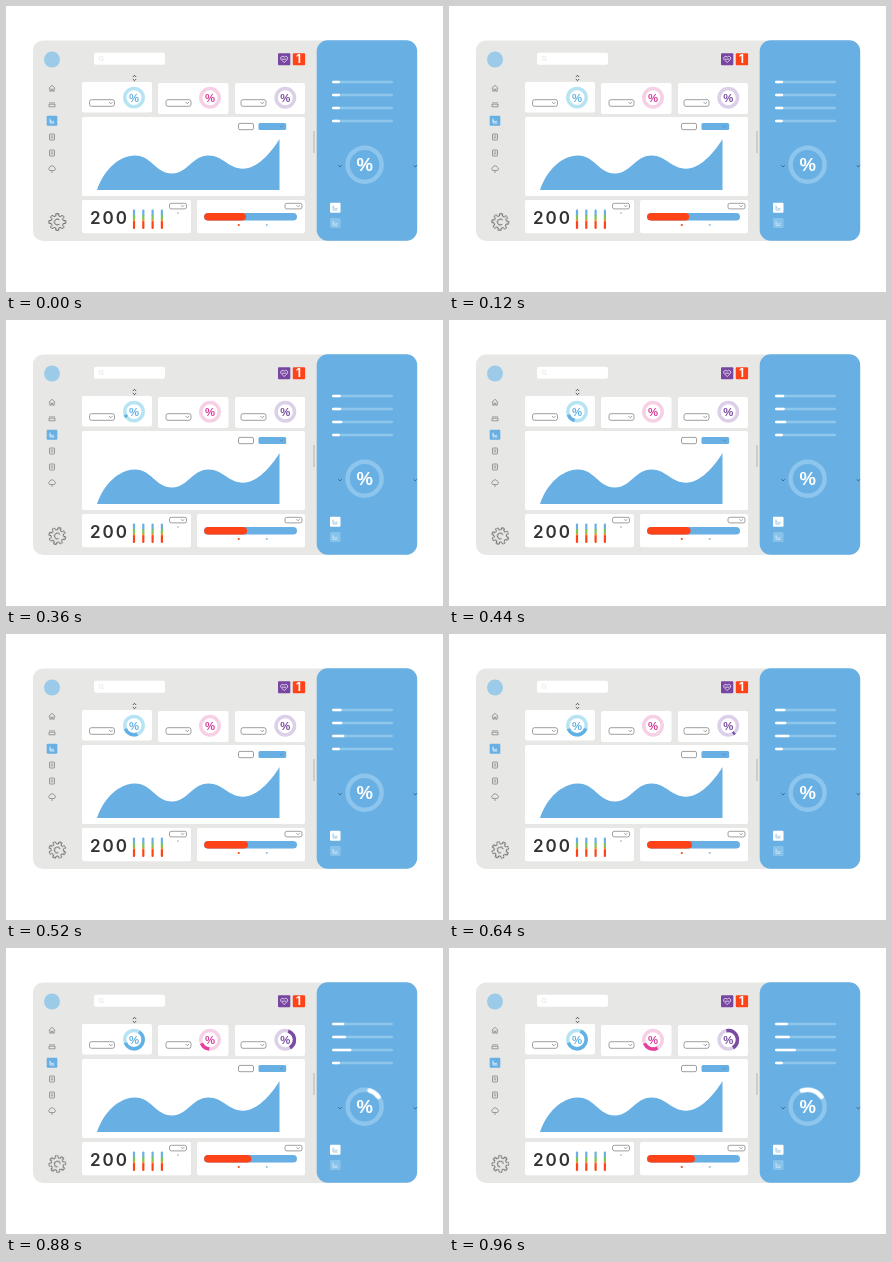
Recreate the animation shown at these times as an HTML page. Size 437 by 286 pixels, loop 1 s.

```html
<!DOCTYPE html>
<html lang="en">
<head>
<meta charset="utf-8">
<title>Dashboard</title>
<style>
html, body { margin: 0; width: 100%; height: 100%; overflow: hidden; background: #fff; }
svg { display: block; width: 437px; height: 286px; }
text { font-family: "Liberation Sans", Arial, sans-serif; font-weight: bold; text-anchor: middle; }
.num { font-family: Inter, Arial, sans-serif; }
.total { font-weight: 600; text-anchor: start; letter-spacing: 2px; }
.card { fill: #fff; }
.line { fill: none; stroke: #6c6c6c; stroke-width: .65; }
.blue { fill: #68b0e4; }
.red { fill: #ff4318; }
.ring { fill: none; stroke-width: 3.5; }
.big { stroke-width: 4.5; }
.arc { stroke-dasharray: 0 400; animation: 1s infinite; }

/* The picture advances every 40 ms; each span is cut into that many steps. */
.grow { animation: grow 1s infinite; }
@keyframes grow {
  0%   { width: var(--w); animation-timing-function: steps(3); }
  12%  { width: calc(var(--w) + .03 * var(--d)); animation-timing-function: steps(6); }
  36%  { width: calc(var(--w) + .18 * var(--d)); animation-timing-function: steps(4); }
  52%  { width: calc(var(--w) + .34 * var(--d)); animation-timing-function: steps(5); }
  72%  { width: calc(var(--w) + .6 * var(--d)); animation-timing-function: steps(4); }
  88%  { width: calc(var(--w) + .88 * var(--d)); animation-timing-function: steps(2); }
  96%, 100% { width: calc(var(--w) + var(--d)); }
}
.a1 { animation-name: a1; }
@keyframes a1 {
  0%, 32% { stroke-dasharray: 0 400; animation-timing-function: steps(1); }
  36% { stroke-dasharray: 18 400; animation-timing-function: steps(4); }
  52% { stroke-dasharray: 92 400; animation-timing-function: steps(5); }
  72% { stroke-dasharray: 175 400; animation-timing-function: steps(4); }
  88% { stroke-dasharray: 217 400; animation-timing-function: steps(2); }
  96%, 100% { stroke-dasharray: 228 400; }
}
.a2 { animation-name: a2; }
@keyframes a2 {
  0%, 68% { stroke-dasharray: 0 400; animation-timing-function: steps(1); }
  72% { stroke-dasharray: 15 400; animation-timing-function: steps(4); }
  88% { stroke-dasharray: 62 400; animation-timing-function: steps(2); }
  96%, 100% { stroke-dasharray: 96 400; }
}
.a3 { animation-name: a3; }
@keyframes a3 {
  0% { stroke-dasharray: 0 400; animation-timing-function: steps(1); }
  60% { stroke-dasharray: 0 400; animation-timing-function: steps(3); }
  72% { stroke-dasharray: 42 400; animation-timing-function: steps(4); }
  88% { stroke-dasharray: 132 400; animation-timing-function: steps(2); }
  96%, 100% { stroke-dasharray: 162 400; }
}
.a4 { animation-name: a4; stroke-linecap: round; }
@keyframes a4 {
  0%, 68% { stroke-dasharray: 0 400; opacity: 0; animation-timing-function: steps(1); }
  72% { stroke-dasharray: 3 400; opacity: 1; animation-timing-function: steps(4); }
  88% { stroke-dasharray: 38 400; opacity: 1; animation-timing-function: steps(2); }
  96%, 100% { stroke-dasharray: 74 400; opacity: 1; }
}
.gear { animation: turn 1s steps(25) infinite; }
@keyframes turn { to { transform: rotate(45deg); } }
</style>
</head>
<body>
<svg viewBox="0 0 437 286">
  <defs>
    <g id="drop">
      <rect class="line" width="25" height="6.6" rx="2"/>
      <path class="line" d="M19.5 2.3l1.8 1.8 1.8-1.8"/>
    </g>
    <g id="drop-s">
      <rect class="line" width="17" height="5.6" rx="1.8"/>
      <path class="line" d="M11.5 1.9l1.6 1.6 1.6-1.6"/>
    </g>
    <g id="stack">
      <rect class="blue" width="2.2" height="6.5" rx="1"/>
      <rect y="5.5" width="2.2" height="5" fill="#7bc65b"/>
      <rect y="10" width="2.2" height="2" fill="#f79a32"/>
      <rect class="red" y="11.5" width="2.2" height="8" rx="1"/>
    </g>
    <g id="doc" class="line">
      <rect x="-2.5" y="-3" width="5" height="6" rx=".6"/>
      <path d="M-1.3-1h2.6M-1.3 .8h2.6"/>
    </g>
    <clipPath id="pill"><rect x="198" y="207" width="93" height="7.7" rx="3.85"/></clipPath>
  </defs>

  <rect x="27" y="34.5" width="384" height="200.5" rx="10" fill="#e7e7e5"/>
  <rect class="blue" x="310.7" y="34.3" width="100.5" height="200.5" rx="11"/>

  <!-- sidebar -->
  <circle cx="46" cy="53.5" r="8" fill="#9bcbe8"/>
  <g class="line">
    <path d="M42.8 82.3l3.2-3 3.2 3M43.8 82v3.2h1.5v-2h1.4v2h1.5V82"/>
    <path d="M43 100.8v-2.6h6v2.6zM43.2 96.8h1.6M45.3 96.8h1.6M47.4 96.8h1.6"/>
    <path d="M43.8 164.5a1.8 1.8 0 0 1 .1-3.3a2.4 2.4 0 0 1 4.4 0a1.8 1.8 0 0 1 0 3.3zM45 166h2"/>
  </g>
  <rect class="blue" x="40.7" y="109.7" width="10.6" height="10" rx="1"/>
  <path d="M44 112.5v4.5h4.5M44 114l2 2 2-1" fill="none" stroke="#fff" stroke-width=".7"/>
  <use href="#doc" x="46" y="131"/>
  <use href="#doc" x="46" y="147"/>
  <g transform="translate(51.3 216)">
    <g class="gear" fill="none" stroke="#555" stroke-width=".9" stroke-linejoin="round">
      <path id="gear"/>
      <path d="M2.2-2.1A3 3 0 1 0 2.2 2.1"/>
    </g>
  </g>

  <!-- header -->
  <rect class="card" x="88" y="46.7" width="71" height="12" rx="2"/>
  <g fill="none" stroke="#ddd" stroke-width=".6"><circle cx="95" cy="52.3" r="2"/><path d="M96.5 53.8l1.3 1.3"/></g>
  <path d="M126.8 71l1.7-1.7 1.7 1.7M126.8 73l1.7 1.7 1.7-1.7" fill="none" stroke="#333" stroke-width=".8"/>
  <rect x="272" y="47.3" width="12.3" height="12" rx="1" fill="#7846a0"/>
  <path d="M278.2 56.6l-3.2-3.2a1.8 1.8 0 0 1 3.2-2.2a1.8 1.8 0 0 1 3.2 2.2zM276 53.2h4.4" fill="none" stroke="#fff" stroke-width=".7"/>
  <rect class="red" x="286.8" y="47.3" width="12.3" height="12" rx="1"/>
  <text class="num" x="292.6" y="57.4" font-size="11.5" fill="#fff">1</text>
  <path d="M308 125v22" stroke="#c2c2c2" stroke-width="1.4"/>

  <!-- cards -->
  <g class="card">
    <rect x="76" y="76" width="70" height="30.5" rx="2"/>
    <rect x="152" y="77" width="70.5" height="31" rx="2"/>
    <rect x="229" y="77" width="70" height="31" rx="2"/>
    <rect x="76" y="111" width="223" height="79" rx="2"/>
    <rect x="76" y="194" width="109" height="33.3" rx="2"/>
    <rect x="191" y="194" width="108" height="33.3" rx="2"/>
  </g>
  <use href="#drop" x="83.5" y="93.7"/>
  <use href="#drop" x="160" y="93.7"/>
  <use href="#drop" x="235" y="93.7"/>

  <g transform="translate(128 91.6)">
    <circle class="ring" r="9.2" stroke="#b7e4f3"/>
    <circle class="ring arc a1" r="9.2" stroke="#62b1e4" pathLength="360" transform="rotate(160) scale(1 -1)"/>
    <text y="3.9" font-size="11.3" fill="#62b1e4">%</text>
  </g>
  <g transform="translate(204 91.8)">
    <circle class="ring" r="9.2" stroke="#f6d0e5"/>
    <circle class="ring arc a2" r="9.2" stroke="#e83d9d" pathLength="360" transform="rotate(157) scale(1 -1)"/>
    <text y="3.9" font-size="11.3" fill="#d93c98">%</text>
  </g>
  <g transform="translate(279.3 91.8)">
    <circle class="ring" r="9.2" stroke="#dcd0e8"/>
    <circle class="ring arc a3" r="9.2" stroke="#794ba2" pathLength="360" transform="rotate(60) scale(1 -1)"/>
    <text y="3.9" font-size="11.3" fill="#794ba2">%</text>
  </g>

  <!-- chart -->
  <rect class="line" x="232.5" y="117.4" width="15" height="6.3" rx="1.5"/>
  <rect class="blue" x="252.5" y="117" width="27.7" height="7" rx="1.5"/>
  <path d="M274 119.7l1.5 1.5 1.5-1.5" fill="none" stroke="#4480ac" stroke-width=".7"/>
  <path class="blue" d="M91 184C98 164 113 149.6 129 149.6C146 149.6 149 167.5 166 167.5C182 167.5 186 149.6 202.5 149.6C217 149.6 222 162.7 237 162.7C251 162.7 265 147 273.5 133V184Z"/>

  <!-- totals -->
  <use href="#drop-s" x="163.5" y="197.3"/>
  <text class="num total" x="84" y="218.4" font-size="17" fill="#333">200</text>
  <use href="#stack" x="126.9" y="203.5"/>
  <use href="#stack" x="136.2" y="203.5"/>
  <use href="#stack" x="145.5" y="203.5"/>
  <use href="#stack" x="154.8" y="203.5"/>
  <path d="M171 207h2" stroke="#999" stroke-width=".8"/>

  <use href="#drop-s" x="279" y="197.3"/>
  <g clip-path="url(#pill)">
    <rect class="blue" x="198" y="207" width="93" height="7.7"/>
    <rect class="red grow" x="198" y="207" height="7.7" rx="3.85" style="--w: 42px; --d: 6px"/>
  </g>
  <circle class="red" cx="232.8" cy="219" r="1.1"/>
  <path d="M259.5 218.5h2.6l-1.3 1.4z" fill="#4d9ad0"/>

  <!-- right panel -->
  <g id="bars"></g>
  <g transform="translate(358.6 158.7)">
    <circle class="ring big" r="17" stroke="#8dc5ec"/>
    <circle class="ring big arc a4" r="17" stroke="#fff" pathLength="360" transform="rotate(-35) scale(1 -1)"/>
    <text y="6.1" font-size="18.5" fill="#fff">%</text>
  </g>
  <path d="M332.5 159.3l1.6 1.6 1.6-1.6M407.7 159.3l1.6 1.6 1.6-1.6" fill="none" stroke="#33597a" stroke-width=".9"/>
  <rect x="324" y="196.7" width="10.5" height="10" rx="1" fill="#fff"/>
  <path d="M327 199.5v4.5h4.5M327.5 201l2 2 2-1" fill="none" stroke="#8bbfe6" stroke-width=".8"/>
  <rect x="324" y="212" width="10.5" height="10" rx="1" fill="#87c2eb"/>
  <path d="M327 214.8v4.5h4.5M327.5 216.3l2 2 2-1" fill="none" stroke="#d5eafa" stroke-width=".8"/>
</svg>
<script>
const growth = [5, 7, 13, 0];
document.getElementById('bars').innerHTML = growth.map((d, i) => {
  const pos = `x="326" y="${74.7 + i * 13}" height="2.5" rx="1.2"`;
  return `<rect ${pos} width="61" fill="#8fc6ec"/>
    <rect ${pos} class="grow" fill="#fff" style="--w: 8px; --d: ${d}px"/>`;
}).join('');

// Eight teeth: four corners each, two on the root circle and two on the rim.
const corners = [[-14, 6.2], [-9, 8.4], [9, 8.4], [14, 6.2]];
const points = [];
for (let tooth = 0; tooth < 8; tooth++) {
  for (const [deg, r] of corners) {
    const a = (tooth * 45 + deg) * Math.PI / 180;
    points.push(`${(r * Math.cos(a)).toFixed(2)} ${(r * Math.sin(a)).toFixed(2)}`);
  }
}
document.getElementById('gear').setAttribute('d', `M${points.join('L')}Z`);
</script>
</body>
</html>
```
